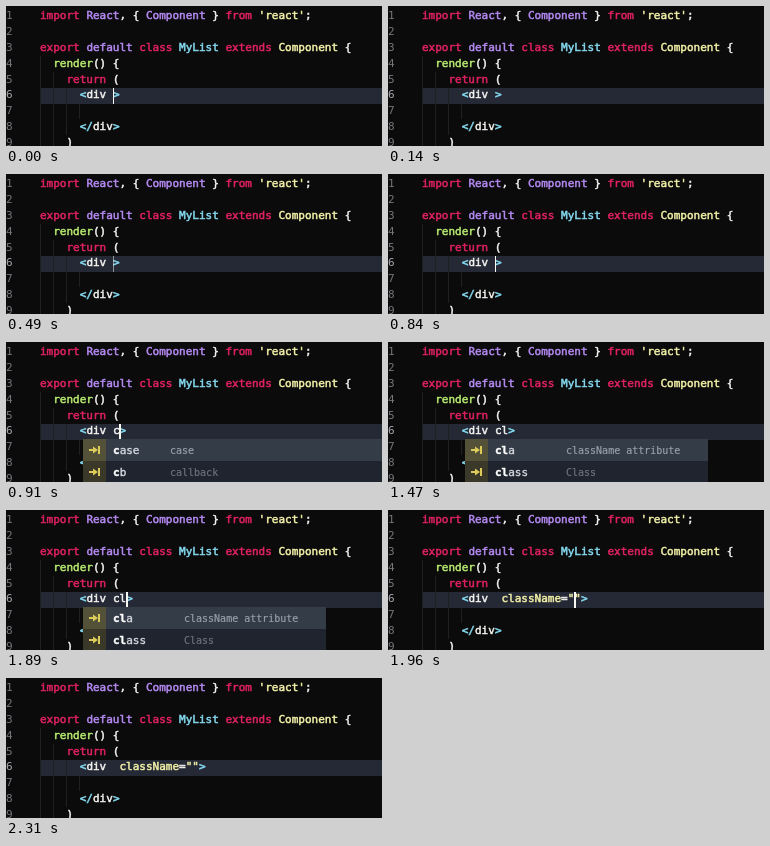
An HTML page for the animation above (2450 ms loop, 376 by 140 pixels).

```html
<!DOCTYPE html>
<html lang="en">
<head>
<meta charset="utf-8">
<style>
  html, body { margin: 0; width: 100%; height: 100%; overflow: hidden; background: #0b0b0c; }
  #stage { position: relative; width: 376px; height: 140px; overflow: hidden; background: #0b0b0c;
    font: 11px/15.87px "DejaVu Sans Mono", monospace; color: #f4f4f0; white-space: pre; }
  #stage div, svg { position: absolute; }
  #code, #numbers { top: 2px; }
  #code { left: 34px; -webkit-text-stroke: .5px; }
  #numbers { left: 0; color: #74767c; }
  #numbers b { font-weight: normal; color: #a6a9b0; }
  #band { left: 34px; top: 82px; width: 342px; height: 16px; background: #252835; }
  .guide { width: 1px; bottom: 0; background: #1f2022; }
  #caret { top: 82px; width: 1.6px; height: 15.5px; background: #f8f8f2; }
  i { font-style: normal; }
  .key { color: #e0225f; }
  .type { color: #b58af2; }
  .name { color: #86dcf2; }
  .fn { color: #b9ee72; }
  .str { color: #f3f2a8; }
  #popup { left: 77px; top: 97px; height: 44px; overflow: hidden; background: #1f242e; }
  .row { left: 0; width: 100%; height: 22px; line-height: 23px; color: #d5d9e0; }
  .row:first-child { background: #343c47; }
  .row:last-child { top: 22px; }
  .icon { left: 0; width: 23px; height: 22px; background: #393829; }
  .row:first-child .icon { background: #545139; }
  .row svg { left: 6px; top: 6px; }
  .label { left: 30px; -webkit-text-stroke: .4px; }
  .label b { color: #fff; }
  .hint { font-size: 10px; color: #6b727d; -webkit-text-stroke: .2px; }
  .row:first-child .hint { color: #979fab; }
</style>
</head>
<body>
<div id="stage">
  <div id="band"></div>
  <div id="numbers">1
2
3
4
5
<b>6</b>
7
8
9</div>
  <div id="code"><i class="key">import</i> <i class="type">React</i>, { <i class="type">Component</i> } <i class="key">from</i> <i class="str">'react'</i>;

<i class="key">export</i> <i class="type">default</i> <i class="key">class</i> <i class="name">MyList</i> <i class="key">extends</i> <i class="str">Component</i> {
  <i class="fn">render</i>() {
    <i class="key">return</i> (
      <i class="name">&lt;</i>div <i id="typed"></i><i class="name">&gt;</i>

      <i class="name">&lt;/</i>div<i class="name">&gt;</i>
    )</div>
  <div id="caret"></div>
  <div id="popup"></div>
</div>
<script>
const $ = id => document.getElementById(id);
const LOOP = 2450, STEP = 70, CHAR = 6.622, LEFT = 34;

// [time, opacity] of the softly blinking caret
const blink = [[0, 1], [140, 0], [210, .1], [350, 1], [420, 1], [560, 0], [770, 0], [840, 1],
  [1260, 1], [1470, 0], [1540, 0], [1750, 1], [2100, 1], [2310, 0], [LOOP, 0]];

// [time, typed markup, caret column, popup]
const firstList = { width: 299, hintX: 87, match: 1, rows: [['case', 'case'], ['cb', 'callback']] };
const secondList = { width: 243, hintX: 101, match: 2, rows: [['cla', 'className attribute'], ['class', 'Class']] };
const edits = [
  [0, '', 11],
  [910, 'c', 12, firstList],
  [980, 'cl', 13, firstList],
  [1050, 'cl', 13, secondList],
  [1960, ' <i class="str">className</i>=<i class="str">""</i>', 23]
];

[[34, 50], [47, 66], [60, 82], [73, 98]].forEach(([x, top], level) => {
  const guide = document.createElement('div');
  guide.className = 'guide';
  const bottom = [140, 140, 129, 113][level];
  guide.style.cssText = `left:${x}px;top:${top}px;height:${bottom - top}px`;
  $('stage').insertBefore(guide, $('code'));
});

const rowHtml = ({ hintX, match }, [label, hint]) =>
  `<div class="row"><div class="icon"><svg width="12" height="10"><path d="M0 5H6M10 1V9" stroke="#dccb58" stroke-width="2"/><path d="M4 1.5L9 5L4 8.5Z" fill="#dccb58"/></svg></div>` +
  `<div class="label"><b>${label.slice(0, match)}</b>${label.slice(match)}</div>` +
  `<div class="hint" style="left:${hintX}px">${hint}</div></div>`;

function opacityAt(t) {
  const i = blink.findIndex(([end]) => end > t);
  const [t0, a] = blink[i - 1], [t1, b] = blink[i];
  return a + (b - a) * (t - t0) / (t1 - t0);
}

let shown;
function draw() {
  const t = Math.floor(performance.now() % LOOP / STEP) * STEP;
  const edit = edits.filter(([start]) => start <= t).pop();
  if (edit !== shown) {
    const [, typed, column, list] = shown = edit;
    $('typed').innerHTML = typed;
    $('caret').style.left = LEFT + column * CHAR + 'px';
    $('popup').hidden = !list;
    if (list) {
      $('popup').style.width = list.width + 'px';
      $('popup').innerHTML = list.rows.map(row => rowHtml(list, row)).join('');
    }
  }
  $('caret').style.opacity = opacityAt(t);
  requestAnimationFrame(draw);
}
draw();
</script>
</body>
</html>
```
